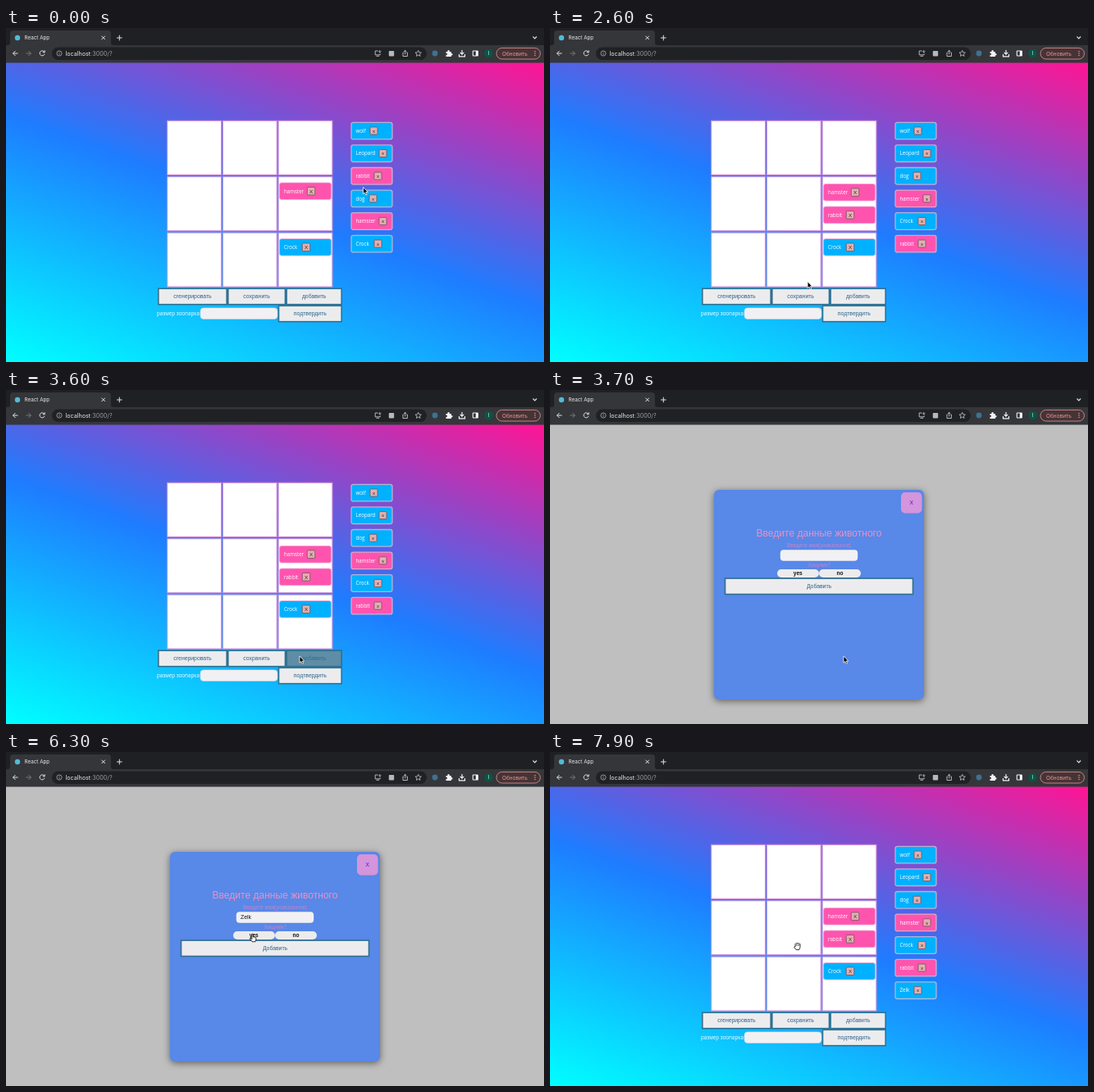
An HTML page for the animation above (8 s loop, 656 by 408 pixels).

```html
<!DOCTYPE html>
<html lang="ru">
<head>
<meta charset="utf-8">
<title>React App</title>
<style>
  html, body { margin: 0; width: 100%; height: 100%; overflow: hidden; background: #202124; }
  #page { position: absolute; left: 0; top: 42px; width: 656px; height: 366px;
          background: linear-gradient(20deg, aqua, #1e7cff 50%, deeppink); }
  svg { position: absolute; left: 0; top: 0; }
  text { font-family: "Liberation Sans", Arial, sans-serif; white-space: pre; }
  .ui { font-family: Inter, sans-serif; }
  .wide { font-family: "Open Sans", sans-serif; }
</style>
</head>
<body>
<div id="page"></div>
<svg id="stage" width="656" height="408" viewBox="0 0 656 408">
  <g id="board"></g>
  <g id="cards"></g>
  <g id="modal"></g>
  <g id="browser"></g>
  <g id="cursor"></g>
</svg>
<script>
const LOOP = 8000;
const TEAL = '#31708e', INK = '#2c638a', BLUE = '#00b1ff', PINK = '#ff54ae', PALE = '#ececee';
const GRAB = 250, DROP = 900, REORDER = 1500, OPEN = 3700, CHOOSE = 6600, CLOSE = 7500;
const $ = id => document.getElementById(id);

// ---------- drawing helpers ----------
const rect = (x, y, w, h, fill, r = 0, extra = '') =>
  `<rect x="${x}" y="${y}" width="${w}" height="${h}" rx="${r}" fill="${fill}" ${extra}/>`;
const text = (s, x, y, size, fill, extra = '') =>
  `<text x="${x}" y="${y}" font-size="${size}" fill="${fill}" ${extra}>${s}</text>`;
const centered = (s, x, y, size, fill, extra = '') =>
  text(s, x, y, size, fill, 'text-anchor="middle" ' + extra);
const line = (d, color = '#dfe1e5', width = 1) =>
  `<path d="${d}" fill="none" stroke="${color}" stroke-width="${width}"/>`;
const dot = (x, y, r, fill) => `<circle cx="${x}" cy="${y}" r="${r}" fill="${fill}"/>`;

// press: 0 = idle, 1 = fully filled with the border colour
function button(label, x, y, w, h, press = 0) {
  return rect(x + .8, y + .8, w - 1.6, h - 1.6, PALE, 0, `stroke="${TEAL}" stroke-width="1.6"`) +
    centered(label, x + w / 2, y + h / 2 + 2.4, 6.85, INK) +
    (press ? rect(x, y, w, h, TEAL, 0, `opacity="${press}"`) : '');
}

// ---------- animals ----------
// colour and distance from card edge to the middle of the X button
const animals = {
  wolf: [BLUE, 28], Leopard: [BLUE, 39], rabbit: [PINK, 33], dog: [BLUE, 27],
  hamster: [PINK, 39], Crock: [BLUE, 33], Zelk: [BLUE, 28]
};

function card(name, x, y, w, big) {
  const [color, bx] = animals[name], s = big ? 9.5 : 9;
  return rect(x + .5, y + .5, w - 1, 20.6, color, 2.5,
      big ? 'stroke="#f2a5d8" stroke-width=".8"' : 'stroke="#d8bdd0" stroke-opacity=".8" stroke-width="1.3"') +
    text(name, x + 6, y + 13, 6.2, '#fff', 'class="wide"') +
    rect(x + bx - s / 2, y + 10.7 - s / 2, s, s, '#e2b0b0', .5, 'stroke="#6d5560" stroke-width=".8"') +
    centered(big ? 'X' : 'x', x + bx, y + 13, 6.2, '#3a2028');
}

// ---------- static parts ----------
function browser() {
  let out = rect(0, 0, 656, 21, '#1f2023') + rect(0, 21, 656, 21.5, '#35363a') +
    `<path d="M2 21q3 0 3-3V7q0-4 4-4h115q4 0 4 4v11q0 3 3 3z" fill="#35363a"/>` +
    dot(14, 12, 3.2, '#4fbcd8') +
    text('React App', 22.5, 14.3, 6.3, '#e8eaed', 'class="ui"') +
    line('M116.5 9.7l4.4 4.4m0-4.4l-4.4 4.4M135 12h6.6m-3.3-3.3v6.6') +
    line('M642.5 10.5l2.3 2.3 2.3-2.3', '#dfe1e5', 1.2);
  out += line('M14.5 31H8.5m3-3l-3 3 3 3') + line('M24.5 31h6m-3-3l3 3-3 3', '#77797d') +
    line('M46.8 29.5a3 3 0 1 0 .2 2.2M47.2 27.3v2.4h-2.4');
  out += rect(56, 23.5, 457, 15.5, '#202124', 7.7) +
    `<circle cx="65" cy="31" r="3.1" fill="none" stroke="#a9acb1" stroke-width=".8"/>` +
    line('M65 30.5v2.3M65 29v.8', '#a9acb1', .8) +
    `<text class="ui" x="72.5" y="33.6" font-size="7.2" fill="#e8eaed">localhost<tspan fill="#9aa0a6">:3000/?</tspan></text>`;
  out += line('M453.5 28h-3.3v4.8h6v-1.6M451.5 34.3h3.6M455.8 27v3m-1.4-1.4l1.4 1.4 1.4-1.4', '#c5c8cc', .9) +
    rect(466.8, 28, 6.4, 6.4, '#b4b7bc', .8) +
    line('M485 30h-1v4.5h5.4V30h-1M486.7 32.4v-5m-1.6 1.5l1.6-1.6 1.6 1.6', '#c5c8cc', .9) +
    line('M502.7 27.4l1.1 2.4 2.6.3-2 1.7.6 2.6-2.3-1.4-2.3 1.4.6-2.6-2-1.7 2.6-.3z', '#c5c8cc', .8) +
    dot(523, 31, 3.4, '#3f7193');
  out += `<path d="M536.5 29h1.8q-.2-2 1.3-2t1.3 2h2v2q1.7-.1 1.7 1.3t-1.7 1.3v1.4h-6.4v-2q1.6 0 1.6-1.2t-1.6-1.1z" fill="#f1f3f4"/>` +
    line('M556 27v5m-2.3-2.2l2.3 2.3 2.3-2.3M552.5 32v2.8h7V32', '#f1f3f4', 1.2) +
    rect(569.3, 28, 6, 6, 'none', .5, 'stroke="#f1f3f4" stroke-width="1.1"') +
    rect(572.8, 28, 2.8, 6, '#f1f3f4') +
    dot(588.5, 31, 5.2, '#0b5546') + centered('I', 588.5, 33.1, 5.8, '#e8f3ee', 'class="ui"') +
    rect(598, 24.4, 53.5, 13.6, '#453437', 6.8, 'stroke="#d98a86" stroke-width=".9"') +
    text('Обновить', 605, 33.5, 6.5, '#f0948d', 'class="ui"') +
    [28.6, 31.1, 33.6].map(y => dot(645, y, .75, '#f0948d')).join('');
  return out;
}

function board(press) {
  let out = '';
  for (let i = 0; i < 9; i++)
    out += rect(196.7 + i % 3 * 67.7, 113.3 + (i / 3 | 0) * 68.4, 65.8, 66, '#fff', 0,
      'stroke="#cf90dc" stroke-width="1.1"');
  return out + button('сгенерировать', 185, 317.5, 85, 21) +
    button('сохранить', 270, 317.5, 71.3, 21) +
    button('добавить', 341.3, 317.5, 68.7, 21, press) +
    text('размер зоопарка', 184, 351.2, 6.2, '#fff', 'class="wide"') +
    rect(237, 342, 94, 13.5, '#f1f1f4', 4, 'stroke="#d9d9e4" stroke-width=".6"') +
    button('подтвердить', 331.7, 338.5, 78.3, 21);
}

function modal(typed, chosen, press) {
  return rect(0, 42, 656, 366, '#bfbfbf') +
    rect(200, 122, 256, 256, '#5888e8', 6, 'style="filter:drop-shadow(0 2px 4px rgba(0,0,0,.5))"') +
    rect(428, 125, 25.5, 25.5, '#d495da', 5) +
    centered('X', 440.7, 139.7, 6.6, '#4a12e2') +
    centered('Введите данные животного', 328, 179.3, 12.05, '#e990c4') +
    centered('Введите имя(уникальное)', 328, 192.2, 6.2, '#d580c6', 'class="wide"') +
    rect(280.8, 195.2, 94.4, 13.6, '#f1f1f4', 4) +
    text(typed, 286, 204.4, 6.9, '#15151a') +
    centered('Хищник?', 328.5, 216, 6.2, '#d580c6', 'class="wide"') +
    rect(277, 219, 51, 10, chosen ? '#d495da' : PALE, 5) +
    rect(328, 219, 51, 10, PALE, 5) +
    centered('yes', 302.3, 226.2, 6.6, chosen ? '#5a12e2' : '#15151a', 'font-weight="bold"') +
    centered('no', 353.5, 226.2, 6.6, '#15151a', 'font-weight="bold"') +
    button('Добавить', 212.7, 229.3, 230.6, 21, press);
}

// ---------- cursor ----------
const outlined = (d, fill, stroke) =>
  `<path d="${d}" fill="${fill}" stroke="${stroke}" stroke-width=".8" stroke-linejoin="round"/>`;
const shapes = {
  arrow: outlined('M0 0v8.2l1.9-1.7 1.3 2.9 1.4-.6L3.3 6h2.5z', '#000', '#fff'),
  pointer: outlined('M-.8.6q.8-1 1.5 0v3.2q2.8 0 3.4 1v2.4L3.2 9.6H-.7L-3 6.4q-.2-1.2.9-.8l1.3 1z', '#fff', '#000'),
  grab: outlined('M-2.4-2.5q.8-1.5 1.6-.4.7-1.4 1.5-.2.9-1 1.5.3 1-.4 1.3.7V1.6L2.3 4.6H-1.4L-3.7 1.5q0-1.4 1.3-.6z', '#fff', '#000') +
    line('M-.8-2.5V0M.7-2.6V0M2.2-2.3V0', '#000', .5),
  beam: line('M-1.5-3.5q1.5 0 1.5 1v5q0 1-1.5 1M1.5-3.5q-1.5 0-1.5 1v5q0 1 1.5 1', '#222', .8),
  none: ''
};
// time, x, y
const path = [
  [0, 435.5, 194.5], [GRAB, 437, 181], [DROP, 360, 226], [1200, 359, 228], [1700, 358, 229],
  [2900, 306, 324.5], [3300, 358, 325], [OPEN, 358, 325], [4400, 323, 202], [5900, 323, 202],
  [6150, 301, 222], [CHOOSE, 300, 222.5], [7100, 301.5, 236.5], [LOOP, 301.5, 237]
];
// cursor kind from each time on
const kinds = [[0, 'arrow'], [DROP, 'grab'], [1900, 'arrow'], [4400, 'beam'], [5100, 'none'],
  [5900, 'beam'], [6000, 'arrow'], [6100, 'pointer'], [6900, 'arrow'], [CLOSE, 'grab']];

const ramp = (t, start, length) => Math.max(0, Math.min(1, (t - start) / length));

function pointerAt(t) {
  const i = path.findIndex(k => k[0] > t);
  const [t0, x0, y0] = path[i - 1], [t1, x1, y1] = path[i];
  const p = (t - t0) / (t1 - t0), s = p * p * (3 - 2 * p);
  return [x0 + (x1 - x0) * s, y0 + (y1 - y0) * s];
}

// ---------- cards in the list, in the cells and under the cursor ----------
function cards(t, x, y) {
  const list = t < REORDER
    ? ['wolf', 'Leopard', 'rabbit', 'dog', 'hamster', 'Crock']
    : ['wolf', 'Leopard', 'dog', 'hamster', 'Crock', 'rabbit'];
  if (t >= CLOSE) list.push('Zelk');
  // a cell shows its animals in list order
  const cell = list.filter(name => name === 'hamster' || name === 'rabbit' && t >= DROP);
  const top = cell.length > 1 ? 190 : 188.5;
  let out = list.map((name, i) => card(name, 420.5, 114.8 + i * 27.6, 51)).join('') +
    cell.map((name, i) => card(name, 333, top + i * 27.6, 64, true)).join('') +
    card('Crock', 333, 257, 64, true);
  if (t > GRAB && t < DROP) out += `<g opacity=".6">${card('rabbit', x - 17, y - 11, 51)}</g>`;
  return out;
}

const drawn = {};
function put(id, markup) {
  if (drawn[id] !== markup) $(id).innerHTML = drawn[id] = markup;
}

function render(t) {
  const [x, y] = pointerAt(t);
  const kind = kinds.filter(k => k[0] <= t).pop()[1];
  const letters = [5100, 5300, 5400, 5500].filter(k => t >= k).length;
  const open = t >= OPEN && t < CLOSE;

  put('board', board(t < OPEN ? ramp(t, 3450, 200) : 0));
  put('cards', cards(t, x, y));
  put('modal', open ? modal('Zelk'.slice(0, letters), t >= CHOOSE, ramp(t, 7150, 200)) : '');
  put('cursor', shapes[kind]);
  $('cursor').setAttribute('transform', `translate(${x} ${y})`);
}

put('browser', browser());
const began = performance.now();
function tick() {
  render((performance.now() - began) % LOOP);
  requestAnimationFrame(tick);
}
tick();
</script>
</body>
</html>
```
